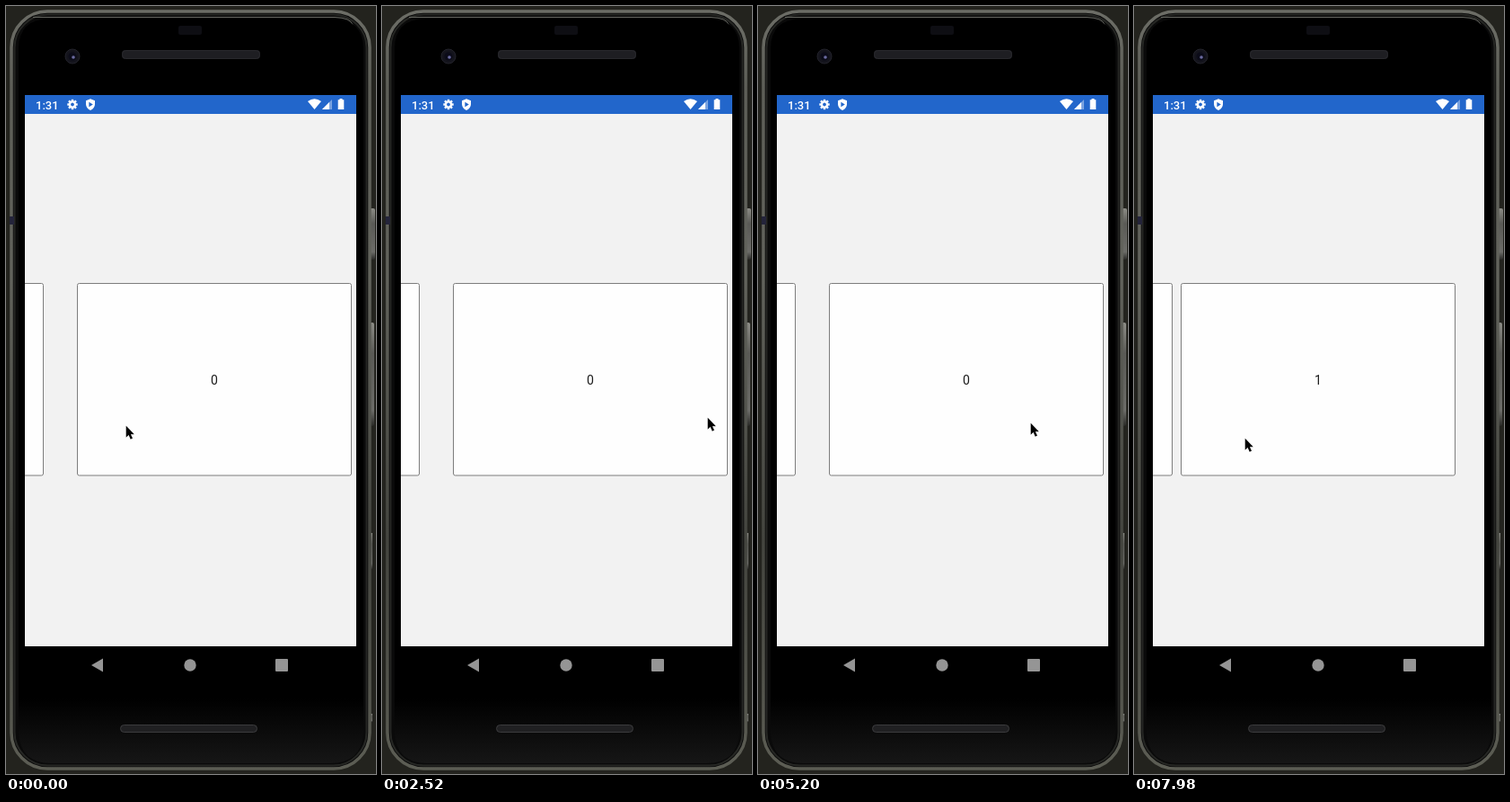
Animation, 412 px wide and 854 px high, one loop 8000 ms. Source, as an HTML page:

```html
<!DOCTYPE html>
<html lang="en">
<head>
<meta charset="utf-8">
<title>Card carousel</title>
<style>
  html, body { margin: 0; width: 100%; height: 100%; overflow: hidden; background: #23231e; }
  svg { display: block; width: 100%; height: 100%; }
  text { font-family: Roboto, sans-serif; }
</style>
</head>
<body>
<svg viewBox="0 0 412 854">
  <defs>
    <clipPath id="screen"><rect x="21" y="99" width="369" height="613"/></clipPath>
    <linearGradient id="rim" x1="0" y1="0" x2="0" y2="1">
      <stop offset="0" stop-color="#6c6d66"/>
      <stop offset=".1" stop-color="#5e5f58"/>
      <stop offset=".35" stop-color="#62635c"/>
      <stop offset=".7" stop-color="#44453f"/>
      <stop offset="1" stop-color="#5c5d54"/>
    </linearGradient>
    <linearGradient id="chin" x1="0" y1="0" x2="0" y2="1">
      <stop offset="0" stop-color="#000"/>
      <stop offset="1" stop-color="#161616"/>
    </linearGradient>
    <linearGradient id="key" x1="0" y1="0" x2="0" y2="1">
      <stop offset="0" stop-color="#8c8c86"/>
      <stop offset=".3" stop-color="#5a5a56"/>
      <stop offset=".85" stop-color="#6c6c68"/>
      <stop offset="1" stop-color="#2b2b28"/>
    </linearGradient>
  </defs>

  <!-- phone body -->
  <rect width="412" height="854" fill="#23231e"/>
  <g fill="url(#key)">
    <rect x="405" y="225" width="6" height="57" rx="2"/>
    <rect x="405" y="352" width="5" height="115" rx="2"/>
    <rect x="406" y="586" width="2" height="40"/>
    <rect x="406" y="787" width="2" height="9"/>
  </g>
  <rect x="6" y="6" width="399" height="842" rx="40" fill="#0a0a0a" stroke="url(#rim)" stroke-width="3.500"/>
  <rect x="9.500" y="9.500" width="392" height="835" rx="37" fill="none" stroke="#262724" stroke-width="2"/>
  <path d="M30 12.500H366Q384 13 386 21" fill="none" stroke="#64655f"/>
  <path d="M14 800V48Q14 14 50 14H361Q398 14 398 48V800Z" fill="#000"/>
  <path d="M14 770H398V808Q396 842 361 842H50Q16 842 14 808Z" fill="url(#chin)"/>
  <path d="M4 234h5v9h-5z" fill="#24243a"/>
  <rect x="192" y="22" width="26" height="10" rx="2" fill="#0e0e13"/>
  <rect x="129" y="49" width="154" height="10" rx="4" fill="#1e1e22"/>
  <rect x="129.500" y="49.500" width="153" height="9" rx="4" fill="none" stroke="#29292d"/>
  <rect x="127.500" y="799.500" width="152" height="8" rx="4" fill="#202022" stroke="#3b3b3d"/>
  <circle cx="74" cy="56" r="8" fill="#14141c" stroke="#24242c"/>
  <circle cx="74" cy="56" r="4.500" fill="#0b0b18"/>
  <circle cx="75" cy="57" r="1.800" fill="#6b6ba0"/>

  <!-- screen -->
  <rect x="21" y="99" width="369" height="613" fill="#f2f2f2"/>
  <g id="cards" clip-path="url(#screen)"></g>
  <rect x="21" y="99" width="369" height="21" fill="#2266cb"/>
  <g fill="#fff">
    <text x="33" y="114.500" font-size="13" font-weight="500">1:31</text>
    <g id="gear" transform="translate(74 109.500)">
      <circle r="3.100" fill="none" stroke="#fff" stroke-width="2.400"/>
    </g>
    <path d="M94 103.200L99 105.200V109Q99 113.500 94 116Q89 113.500 89 109V105.200Z"/>
    <path d="M92.400 106.800L96.800 109.500L92.400 112.200Z" fill="#2266cb"/>
    <path d="M336 106Q343.500 100.500 351 106L343.500 115Z"/>
    <path d="M363 104V115H352Z" opacity=".4"/>
    <path d="M360 107V115H352Z"/>
    <path d="M371.500 103h3v1.300h1.800v10.700h-6.600v-10.700h1.800z"/>
  </g>

  <!-- navigation -->
  <g fill="#959595">
    <path d="M95 733L108 725.500V740.500Z"/>
    <circle cx="205" cy="733" r="6.700"/>
    <rect x="300" y="726" width="14" height="14" rx="1"/>
  </g>

  <g id="cursor">
    <path d="M.7 .8V13.800L3.600 11.100L5.700 15.800L8 14.800L5.900 10.200H9.800Z"
      stroke="#fff" stroke-width="1.600" paint-order="stroke"/>
  </g>
</svg>
<script>
const NS = "http://www.w3.org/2000/svg";
const LOOP = 8000;
const DRAG = 5860, RELEASE = 6000, SETTLE = 6900;
const byId = id => document.getElementById(id);

function add(parent, tag, attrs, label) {
  const el = document.createElementNS(NS, tag);
  for (const k in attrs) el.setAttribute(k, attrs[k]);
  if (label) el.textContent = label;
  return parent.appendChild(el);
}

for (let i = 0; i < 8; i++) {
  add(byId("gear"), "rect", { x: -1.2, y: -5.7, width: 2.4, height: 2.2, transform: `rotate(${i * 45})` });
}

const cards = [[-264, "0"], [79, "0"], [422, "0"], [737, "1"]].map(([x, label]) => {
  const g = add(byId("cards"), "g", {});
  add(g, "rect", { x: 0.5, y: 308.5, width: 305, height: 213.5, rx: 2, fill: "#fefefe", stroke: "#7d7d7d" });
  add(g, "text", { x: 153, y: 421, "font-size": 14, "text-anchor": "middle", fill: "#1c1c1c" }, label);
  return { g, x };
});

const part = (t, a, b) => Math.min(1, Math.max(0, (t - a) / (b - a)));
const easeOut = p => 1 - (1 - p) ** 3;
const smooth = p => p * p * (3 - 2 * p);

// drag at constant speed, then a fling that slows to rest
const scroll = t => 218 * part(t, DRAG, RELEASE) + 467 * easeOut(part(t, RELEASE, SETTLE));

const moves = [
  [300, 1500, 229, -9, smooth],
  [3340, 4070, -59, 6, easeOut],
  [DRAG, RELEASE - 10, -180, 17, p => p]
];

function pointer(t) {
  let x = 133, y = 466;
  for (const [a, b, dx, dy, ease] of moves) {
    const p = ease(part(t, a, b));
    x += dx * p;
    y += dy * p;
  }
  return [Math.round(x), Math.round(y)];
}

function draw(t) {
  const s = Math.round(scroll(t));
  for (const { g, x } of cards) g.setAttribute("transform", `translate(${x - s} 0)`);
  byId("cursor").setAttribute("transform", `translate(${pointer(t).join(" ")})`);
}

const start = performance.now();
function tick() {
  draw((performance.now() - start) % LOOP);
  requestAnimationFrame(tick);
}
tick();
</script>
</body>
</html>
```
